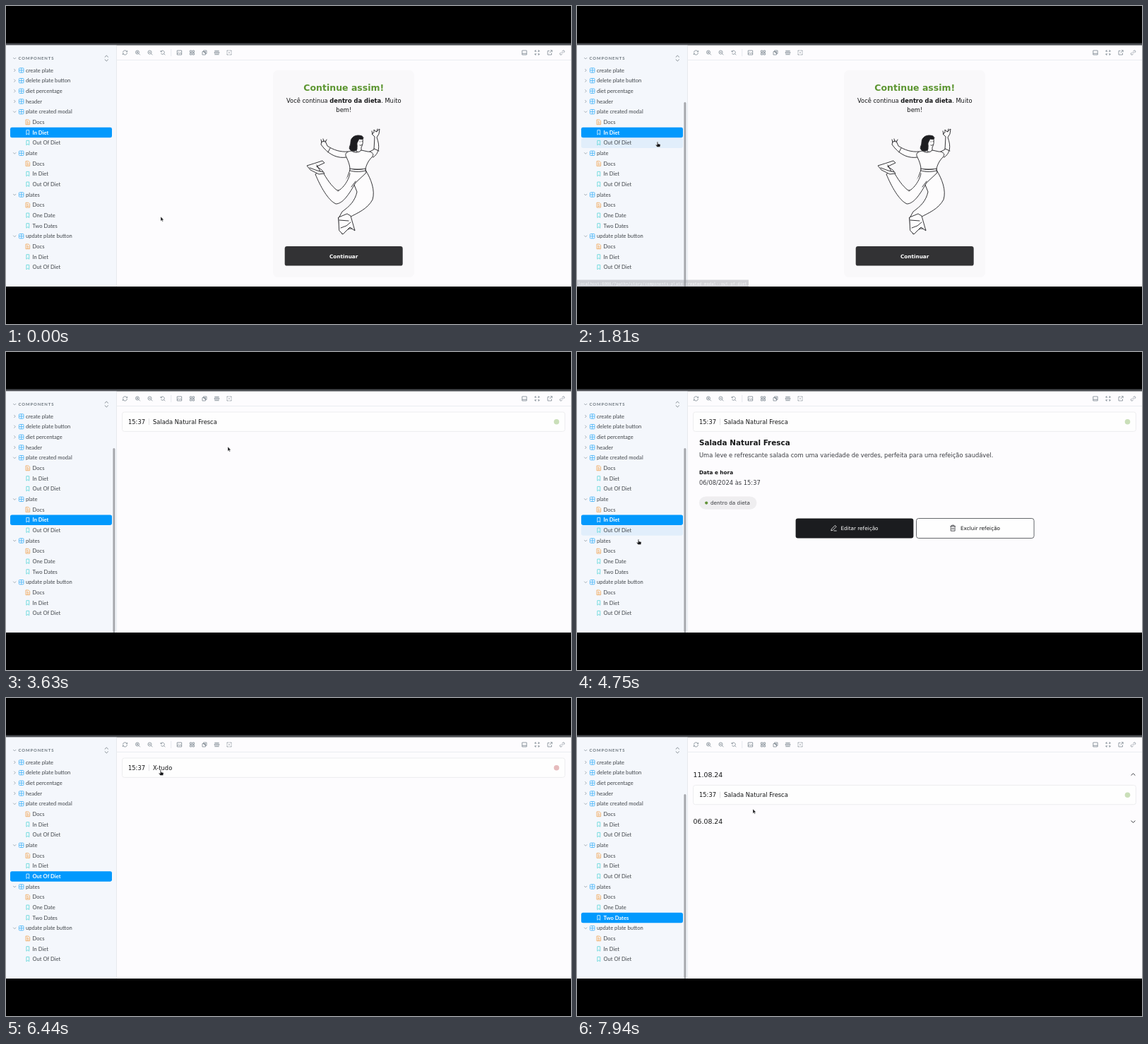
An HTML page that plays this animation: 800 by 450 pixels, repeating every 8000 ms.

```html
<!DOCTYPE html>
<html lang="pt-BR">
<head>
<meta charset="utf-8">
<title>Component stories</title>
<style>
  html, body { margin: 0; width: 100%; height: 100%; overflow: hidden; background: #000; }
  svg { display: block; width: 100vw; height: 100vh; }
  text { font-family: "DejaVu Sans", sans-serif; font-size: 8.33px; fill: #151617; white-space: pre; }
  .b { font-weight: 700; }
  .mid { text-anchor: middle; }
  .sm { font-size: 7.29px; }
  .soft { fill: #3a3c41; }
  .row text, .head { font-family: Lato, "Open Sans", sans-serif; font-size: 7.6px; fill: #41464b; }
  .row path, .tool path { fill: none; stroke-width: .75; }
  .row .chev { stroke: #8a949c; }
  .row .comp { stroke: #35aef8; }
  .row .docs { stroke: #f0a04b; }
  .row .story { stroke: #4fd3d6; }
  .row.on text { fill: #fff; font-weight: 700; }
  .row.on path { stroke: #fff; }
  .tool path { stroke: #737f88; }
  .line path { stroke: #2b2b2e; stroke-width: .95; stroke-linejoin: round; stroke-linecap: round; }
</style>
</head>
<body>
<svg id="stage" viewBox="0 0 800 450"></svg>
<script>
const LOOP = 8000, ROW0 = 91, STEP = 14.667;

// kind: c closed group, o open group, d docs, s story
const rows = [
  ["c", "create plate"], ["c", "delete plate button"], ["c", "diet percentage"], ["c", "header"],
  ["o", "plate created modal"], ["d", "Docs"], ["s", "In Diet"], ["s", "Out Of Diet"],
  ["o", "plate"], ["d", "Docs"], ["s", "In Diet"], ["s", "Out Of Diet"],
  ["o", "plates"], ["d", "Docs"], ["s", "One Date"], ["s", "Two Dates"],
  ["o", "update plate button"], ["d", "Docs"], ["s", "In Diet"], ["s", "Out Of Diet"]
];
const rowY = i => ROW0 + STEP * i;

const selected = [[0, 6], [2040, 7], [3150, 10], [5030, 11], [7400, 15]];
const pages = [[0, "good"], [2180, "bad"], [3290, "salad"], [5180, "burger"], [7760, "dates"]];
const opened = { salad: [3930, 9000], burger: [5720, 6220] };
const links = [
  [560, 1690, "plate-created-modal--in-diet"], [1750, 2300, "plate-created-modal--out-of-diet"],
  [2860, 3330, "plate--in-diet"], [4860, 5300, "plate--out-of-diet"], [7180, 7600, "plates--two-dates"]
];
const bars = [[420, 6050], [6880, 9000]];

// time, x, y of the pointer tip
const track = [
  [0, 219, 298], [100, 219, 298], [800, 122, 184], [1500, 119, 183], [1700, 115, 191], [1810, 114, 192],
  [2300, 112, 193], [2690, 106, 201], [2860, 104, 205], [2940, 94, 238], [3000, 93, 241], [3230, 93, 240],
  [3600, 314, 134], [3680, 314, 134], [3860, 298, 103], [4200, 296, 103], [4480, 180, 200],
  [4750, 87, 265], [4900, 88, 254], [5200, 89, 253], [5600, 218, 102], [6460, 219, 102],
  [6940, 112, 268], [7250, 94, 309], [7450, 95, 309], [7700, 205, 222], [7940, 249, 157], [8000, 250, 156]
];

const text = (x, y, s, cls = "", extra = "") => `<text x="${x}" y="${y}" class="${cls}" ${extra}>${s}</text>`;
const rect = (x, y, w, h, fill, extra = "") => `<rect x="${x}" y="${y}" width="${w}" height="${h}" fill="${fill}" ${extra}/>`;
const dot = (x, y, r, fill) => `<circle cx="${x}" cy="${y}" r="${r}" fill="${fill}"/>`;
const path = (d, extra = "") => `<path d="${d}" ${extra}/>`;
const group = (id, body, extra = "") => `<g id="${id}" ${extra}>${body}</g>`;

function sidebarRow([kind, label], i) {
  const isGroup = kind === "c" || kind === "o";
  const icon = isGroup
    ? path(kind === "c" ? "M11.3-2l2 2-2 2" : "M10.2-1l2 2 2-2", 'class="chev"') +
      path("M19.4-3.2h4.6q1 0 1 1v4.4q0 1-1 1h-4.6q-1 0-1-1v-4.4q0-1 1-1zM18.4 0h6.6M21.7-3.2v6.4", 'class="comp"')
    : kind === "d"
      ? path("M28-3.4h3.8l1.8 1.8v5h-5.6zM29.3-1.3h2.2M29.3.3h3M29.3 1.9h3", 'class="docs"')
      : path("M28.9-3.3h3.8v6.5l-1.9-1.6-1.9 1.6z", 'class="story"');
  return `<g class="row" transform="translate(0 ${rowY(i)})">${icon}${text(isGroup ? 28 : 37.5, 2.6, label)}</g>`;
}

const lens = "M2-.5a2.5 2.5 0 1 0-5 0a2.5 2.5 0 1 0 5 0M1.4 1.3l2 2";
const tools = [
  [168.5, "M-3-.2a3 3 0 0 1 5-2.1l.8.9M3 .2a3 3 0 0 1-5 2.1l-.8-.9M-3.2 3v-1.8h1.7M3.2-3v1.8h-1.7"],
  [186.5, lens + "M-1.8-.5h2.6M-.5-1.8v2.6"],
  [204, lens + "M-1.8-.5h2.6"],
  [222, "M-2.6-1.6a2.6 2.6 0 1 1 0 2.6M-2.9-3v1.9h1.9M1.5 1.5l1.8 1.8"],
  [245.5, "M-3.2-3h6.4v6h-6.4zM-3.2 2l2-2 1.5 1.3 1.2-1.2 1.7 1.7M-1.5-1.3h.4"],
  [263.5, "M-3-3h2.4v2.4h-2.4zM.6-3h2.4v2.4h-2.4zM-3 .6h2.4v2.4h-2.4zM.6.6h2.4v2.4h-2.4z"],
  [281, "M-3-1.4h4.4v4.4h-4.4zM-1.4-1.4v-1.6h4.4v4.4h-1.6M-1.4-1.4l2.8 2.8M-.2-1.4l1.6 1.6"],
  [298.5, "M-3.2-2.7h6.4M-3.2 2.7h6.4M-3.2-1h6.4v2h-6.4zM-1-1v1M1-1v1"],
  [316, "M-3-1.5v-1.5h1.5M-.6-3h1.2M1.5-3h1.5v1.5M3-.6v1.2M3 1.5v1.5h-1.5M.6 3h-1.2M-1.5 3h-1.5v-1.5M-3 .6v-1.2M-1 0h2"],
  [734, "M-3.2-3h6.4v6h-6.4zM-3.2 1.2h6.4"],
  [752, "M-3-1.2v-1.8h1.8M1.2-3h1.8v1.8M3 1.2v1.8h-1.8M-1.2 3h-1.8v-1.8M-3-3l2 2M3-3l-2 2M3 3l-2-2M-3 3l2-2"],
  [770, "M-.5-2.5h-2.5v5.5h5.5v-2.5M.8-3.2h2.4v2.4M3.2-3.2l-3.5 3.5"],
  [787.5, "M-.8.8l1.9-1.9M-.2-1.7l1-1a1.3 1.3 0 0 1 2 2l-1 1M.2 1.7l-1 1a1.3 1.3 0 0 1-2-2l1-1"]
];

const jumper = `<g class="line" fill="#fdfcfd">
  ${path("M471 300L484 303 494 317Q486 312 481 319L476 323Q472 314 471 300z")}
  ${path("M509 232C517 245 523 261 519 274C512 287 498 293 486 299L484 304 471 300 476 291C487 283 494 276 497 263L487 238z")}
  ${path("M487 232C482 247 476 260 469 261C461 255 454 245 447 232L438 238C445 255 456 275 467 280C477 280 486 266 495 250L510 236 509 231z")}
  ${path("M447 232L451 237 443 238 431 232 426 226Q436 223 448 219L451 222 440 227z")}
  ${path("M471 299L483 294 488 297 494 318 487 313 482 318 477 323 472 318z")}
  ${path("M472 303L485 304M474 314L482 311 488 306M430 229L441 233 449 235M440 225L445 234", 'fill="none"')}
  ${path("M484 206C474 207 464 204 455 198L452 191 447 192 446 196 450 201C459 211 470 216 482 214z")}
  ${path("M513 207L521 203 522 185 518 181 521 179 521 175 524 178 529 174 528 181 525 186C530 199 528 209 520 214z")}
  ${path("M489 205C482 206 479 209 482 214C485 220 487 226 487 231H509C510 225 513 219 518 214C522 210 519 206 512 206L503 204Q496 210 489 205z")}
  ${path("M487 230Q498 233 509 230V233Q498 236 487 233zM459 201L456 207M521 202L528 205M487 237C485 247 478 257 470 262M495 248L489 256", 'stroke-dasharray="3 .7"')}
  ${path("M497 198L496 206Q500 208 503 204L503 200Q506 196 505 187L498 184 494 190z")}
  ${path("M504 184C496 181 488 185 488 193C488 198 484 201 488 204Q494 207 497 203L497 194 500 188Q505 190 506 187z", 'fill="#1d1d20"')}
  ${path("M501 192h.4M504 191.5h.3M501 197Q503 198 504 196.5", 'fill="none"')}
  ${path("M447 193L446 189M450 192L449 188M452 193L454 189M519 181L518 177M525 178L526 174", 'fill="none"')}
</g>`;

const sitter = `<g class="line" fill="#fdfcfd">
  ${path("M426 321C429 290 439 253 456 241C466 233 494 232 505 241C522 254 531 288 532 321z", 'style="fill:#cbc9cf;stroke:none"')}
  ${path("M448 231C444 247 445 266 443 284L461 286C463 270 465 256 464 243L480 234 474 229z")}
  ${path("M474 231C479 246 479 267 484 284L501 280C497 260 499 246 490 234Q484 229 474 231z")}
  ${path("M443 283L441 291Q448 295 463 292L463 287 457 283 452 287z")}
  ${path("M482 283L482 292Q494 294 508 290Q508 285 501 280L494 286z")}
  ${path("M441 290Q452 292 463 290M482 289Q496 291 508 288M450 287l6-3M490 287l6-3M448 238Q456 242 463 236M480 237Q486 241 492 236", 'fill="none"')}
  ${path("M448 213C444 220 440 226 442 230C447 235 455 237 463 236L462 231 451 226 455 215z")}
  ${path("M481 207C484 213 489 216 493 210C497 202 497 196 499 190L517 185 515 183 500 184 497 180 495 187C491 193 489 198 486 201z")}
  ${path("M459 195C451 198 446 205 444 213L455 217C455 223 453 228 453 231Q466 235 481 231L480 212 490 206C488 198 483 196 475 194Q467 200 459 195z")}
  ${path("M456 205L455 217M480 202L480 212M460 197Q467 202 474 197M502 184L516 182", 'fill="none"')}
  ${path("M465 178C463 183 462 187 464 189L468 190 467 196Q471 199 474 195L473 180z")}
  ${path("M463 178Q467 172 474 175Q478 181 474 187L471 183 471 178 465 180z", 'fill="#1d1d20"')}
  ${path("M465 182h.4M468 181h.4M464 187h2.3", 'fill="none"')}
</g>`;

const modal = (title, color, line1, line2, art) =>
  rect(378, 91, 200, 293, "#f9f8fa", 'rx="7"') +
  text(478.3, 119.6, title, "b mid", `style="font-size:12.5px;fill:${color}"`) +
  text(478.3, 137.2, line1, "mid") + text(478.3, 149.8, line2, "mid") + art +
  rect(394.7, 340, 167, 27.6, "#323234", 'rx="3.2"') +
  text(478.2, 356.6, "Continuar", "b mid sm", 'style="fill:#fff"');
const strong = s => `<tspan class="b">${s}</tspan>`;

const item = (y, name, color) =>
  rect(164.6, y - 13.8, 626.8, 27.4, "#fefefe", 'rx="3" stroke="#ebebee" stroke-width=".9"') +
  text(173, y + 3.1, "15:37") + rect(202.2, y - 4.6, .8, 9, "#d9dadd") + text(208, y + 3.1, name) +
  dot(779.5, y, 3.8, color);

const details = (id, name, about, status, color) => group(id,
  text(173, 132, name, "b", 'style="font-size:10.42px"') +
  text(173, 149, about, "soft") +
  text(173, 172.6, "Data e hora", "b sm") +
  text(173, 188.4, "06/08/2024 às 15:37", "soft") +
  rect(173, 204.4, 81.4, 18.4, "#efeef0", 'rx="9.2"') + dot(183.2, 213.6, 2.1, color) +
  text(189, 216.3, status, "sm soft") +
  rect(309.6, 235.5, 166.8, 28, "#1b1c1f", 'rx="3.2"') +
  path("M359.8 252.8l.6-2.4 5-5 1.8 1.8-5 5zM363.5 253h4.2", 'fill="none" stroke="#fff" stroke-width=".8"') +
  text(373.4, 252.2, "Editar refeição", "sm", 'style="fill:#fff"') +
  rect(480.5, 235.5, 166.6, 28, "#fefefe", 'rx="3.2" stroke="#55575c" stroke-width=".9"') +
  path("M528.5 246.5h7.4M530.6 246.5v-1.4h3.2v1.4M529.3 246.5v6.7h5.8v-6.7M531.2 248.4v3M533.2 248.4v3", 'fill="none" stroke="#303236" stroke-width=".8"') +
  text(543, 252.2, "Excluir refeição", "sm"), 'clip-path="url(#fold)"');

const chevron = (y, dir) => path(`M784.6 ${y + 1.4 * dir}l2.9 ${-2.8 * dir} 2.9 ${2.8 * dir}`, 'fill="none" stroke="#3a3c41" stroke-width="1"');
const GREEN = "#cadfb9", RED = "#e6bbbd";

const stage = document.getElementById("stage");
stage.innerHTML =
  '<defs><clipPath id="fold"><rect id="foldBox" x="160" y="113" width="640" height="0"/></clipPath></defs>' +
  rect(0, 0, 800, 450, "#000") + rect(0, 52.6, 800, 4, "#4a4d51") +
  rect(0, 55.6, 800, 341.4, "#fdfcfe") + rect(0, 55.6, 156, 341.4, "#f4f7fc") +
  rect(156, 55.6, .8, 341.4, "#e2e5ea") + rect(156.5, 76, 643.5, .8, "#e8eaee") +
  path("M10.2 73l2 2 2-2", 'fill="none" stroke="#8a949c" stroke-width=".75"') +
  text(17.6, 76.1, "COMPONENTS", "head b", 'style="font-size:5.9px;letter-spacing:.9px;fill:#6b757d"') +
  path("M139.8 72.4l2.5-2.3 2.5 2.3M139.8 75.6l2.5 2.3 2.5-2.3", 'fill="none" stroke="#6b757d" stroke-width=".8"') +
  rect(6, 0, 144, 14.5, "#e1eefb", 'rx="2.4" id="hover"') +
  rect(6, 0, 144, 14.5, "#0299fd", 'rx="2.4" id="pick"') +
  rows.map(sidebarRow).join("") +
  rect(151.4, 136, 3, 261, "#a6a8ad", 'rx="1.5" id="bar"') +
  tools.map(([x, d]) => `<g class="tool" transform="translate(${x} 66)">${path(d)}</g>`).join("") +
  rect(233.4, 61, .8, 10, "#e0e3e8") +
  group("good", modal("Continue assim!", "#5d9632", `Você continua ${strong("dentro da dieta")}. Muito`, "bem!", jumper)) +
  group("bad", modal("Que pena!", "#b93640", `Você ${strong("saiu da dieta")} dessa vez, mas`, "continue se esforçando e não desista!", sitter)) +
  group("salad", item(98.8, "Salada Natural Fresca", GREEN) +
    details("saladMore", "Salada Natural Fresca", "Uma leve e refrescante salada com uma variedade de verdes, perfeita para uma refeição saudável.", "dentro da dieta", "#639339")) +
  group("burger", item(98.8, "X-tudo", RED) +
    details("burgerMore", "X-tudo", "Um lanche completo com hambúrguer, queijo, ovo, bacon e salada no pão.", "fora da dieta", "#bf3b44")) +
  group("dates", text(164.6, 111.7, "11.08.24", "", 'style="font-size:9.375px"') + chevron(108.2, 1) +
    item(137.2, "Salada Natural Fresca", GREEN) +
    text(164.6, 178.4, "06.08.24", "", 'style="font-size:9.375px"') + chevron(175, -1)) +
  group("link", rect(0, 387.5, 0, 9.5, "#9b9da3", 'id="linkBox" opacity=".85"') +
    text(1.6, 394.6, "", "", 'id="linkText" style="font:5.6px \'DejaVu Sans Mono\',monospace;fill:#f2f3f5"')) +
  group("cursor",
    path("M0 0v6.4l1.5-1.3 1 2.2 1-.5-1-2.1h2z", 'id="arrow"') +
    path("M-.7.4Q0-.5.7.4V3l2.6.6q.9.3.8 1.2L3.5 7.6H-.6L-2.6 4.8q-.2-.9.7-.7l1.2.9z", 'id="hand"'),
    'fill="#16171a" stroke="#fff" stroke-width=".45"') +
  rect(0, 397, 800, 53, "#000");

const $ = id => document.getElementById(id);
const rowNodes = [...document.querySelectorAll(".row")];
const show = (node, on) => node.setAttribute("display", on ? "inline" : "none");
const latest = (list, t) => list.reduce((v, [start, value]) => t >= start ? value : v, list[0][1]);
const clamp = v => Math.max(0, Math.min(1, v));
const ease = u => u * u * (3 - 2 * u);
const fade = (t, a, b, d) => clamp(Math.min((t - a) / d, (b - t) / d));

function pointer(t) {
  let i = 1;
  while (i < track.length - 1 && track[i][0] < t) i++;
  const [a, x0, y0] = track[i - 1], [b, x1, y1] = track[i];
  const u = ease(clamp((t - a) / (b - a)));
  return [x0 + (x1 - x0) * u, y0 + (y1 - y0) * u];
}

function rowAt([x, y]) {
  const i = Math.round((y - ROW0) / STEP);
  return x > 6 && x < 150 && i >= 0 && i < rows.length ? i : -1;
}

function render(t) {
  const pick = latest(selected, t), page = latest(pages, t);
  const tip = pointer(t), over = rowAt(pointer(Math.max(0, t - 60)));

  rowNodes.forEach((node, i) => node.classList.toggle("on", i === pick));
  $("pick").setAttribute("y", rowY(pick) - 7.2);
  show($("hover"), over >= 0);
  $("hover").setAttribute("y", rowY(over) - 7.2);
  $("bar").setAttribute("opacity", Math.max(...bars.map(([a, b]) => fade(t, a, b, 150))));

  for (const [, name] of pages) show($(name), name === page);
  const span = opened[page];
  const open = span ? ease(fade(t, span[0], span[1], 180)) : 0;
  $("foldBox").setAttribute("height", 153 * open);

  const link = links.find(([a, b]) => t >= a && t < b);
  show($("link"), link);
  if (link) {
    const url = "localhost:6006/?path=/story/components-" + link[2];
    $("linkText").textContent = url;
    $("linkBox").setAttribute("width", url.length * 3.372 + 3.6);
    $("link").setAttribute("opacity", fade(t, link[0], link[1], 120));
  }

  const onItem = span && tip[0] > 164 && tip[1] > 85 && tip[1] < 112.5;
  const hand = rowAt(tip) >= 0 || onItem;
  show($("hand"), hand);
  show($("arrow"), !hand);
  $("cursor").setAttribute("transform", `translate(${tip[0]} ${tip[1]})`);
}

function tick(now) {
  render(now % LOOP);
  requestAnimationFrame(tick);
}
render(0);
requestAnimationFrame(tick);
</script>
</body>
</html>
```
